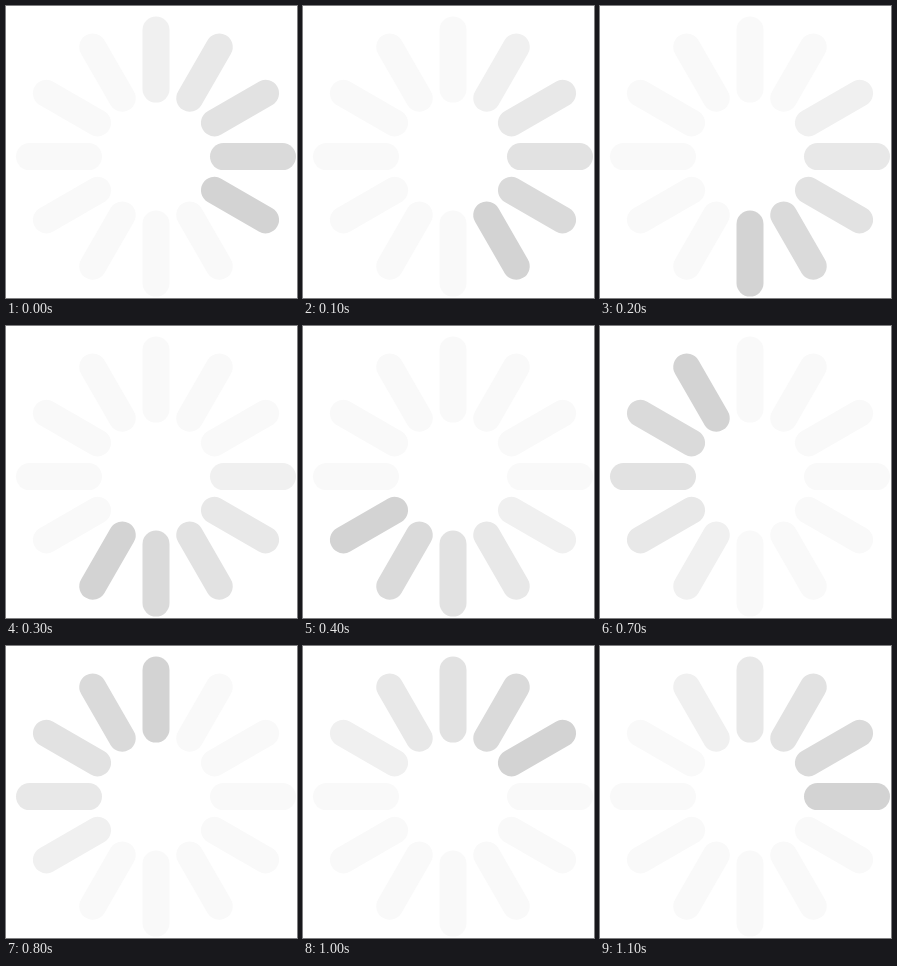
These frames come from a looping animation (291 px wide and 292 px high, 1.2 s). An HTML page:

```html
<!DOCTYPE html>
<html lang="en">
<head>
<meta charset="utf-8">
<title>Loading spinner</title>
<style>
  html, body { margin: 0; width: 100%; height: 100%; overflow: hidden; background: #fff; }
  svg { display: block; }
</style>
</head>
<body>
<svg width="291" height="292" viewBox="0 0 291 292">
  <g id="spokes" transform="translate(150 150.6)" stroke-width="27" stroke-linecap="round"></g>
</svg>
<script>
const COUNT = 12, STEP_MS = 100;
// Shades from the leading spoke backwards; the rest stay at the resting shade.
const TRAIL = ['#d3d3d3', '#dadada', '#e2e2e2', '#e8e8e8', '#f0f0f0'];
const REST = '#f9f9f9';

const group = document.getElementById('spokes');
const spokes = Array.from({ length: COUNT }, (_, i) => {
  const line = document.createElementNS('http://www.w3.org/2000/svg', 'line');
  line.setAttribute('x1', 67.5);
  line.setAttribute('x2', 126.5);
  line.setAttribute('transform', `rotate(${i * 360 / COUNT})`);
  return group.appendChild(line);
});

const start = performance.now();

function draw() {
  const head = 1 + Math.floor((performance.now() - start) / STEP_MS) % COUNT;
  spokes.forEach((line, i) => {
    const lag = (head - i + COUNT) % COUNT;
    line.setAttribute('stroke', TRAIL[lag] || REST);
  });
  requestAnimationFrame(draw);
}
draw();
</script>
</body>
</html>
```
